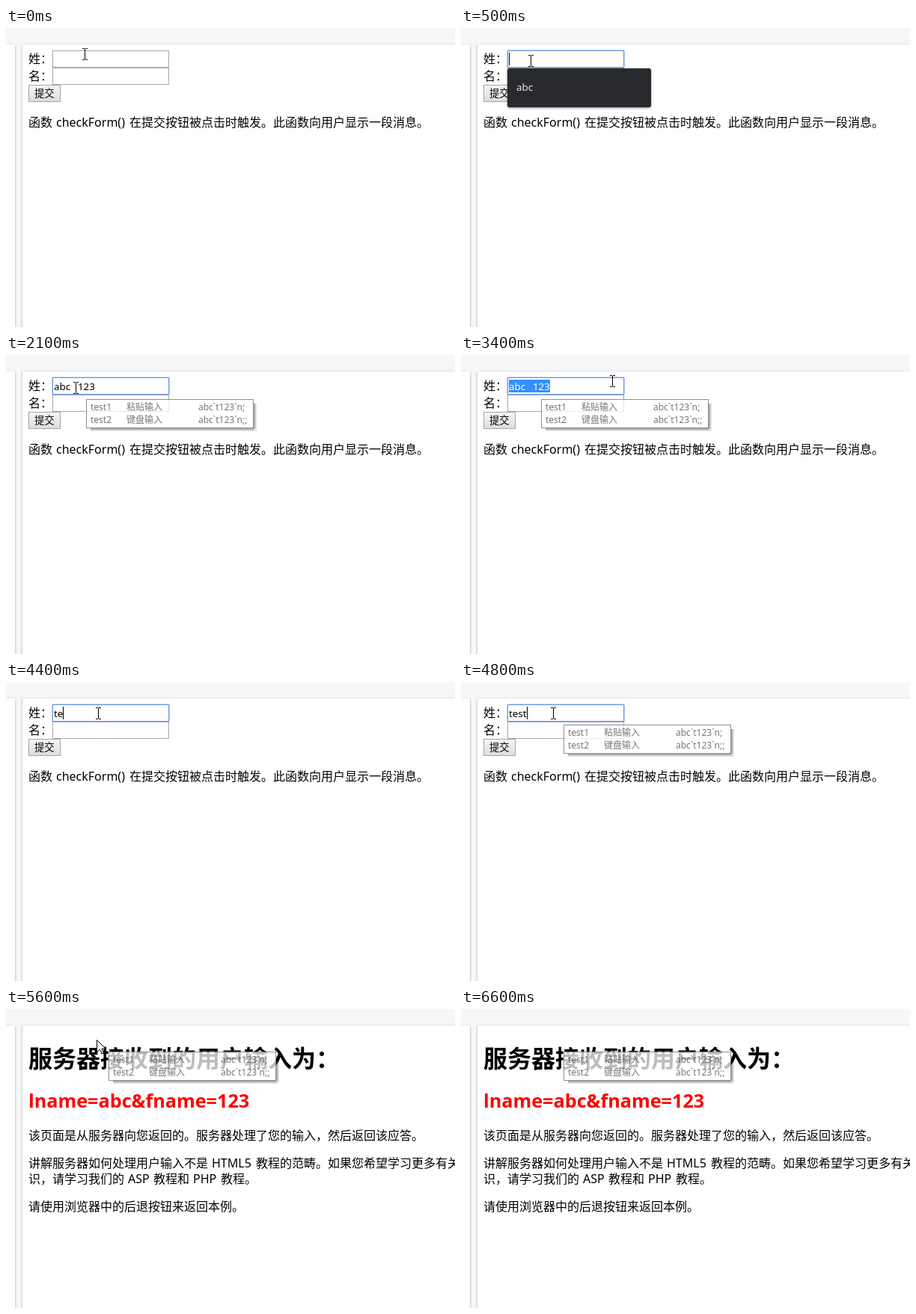
These frames come from a looping animation (600 px wide and 400 px high, 6.9 s). An HTML page with a canvas:

```html
<!DOCTYPE html>
<html lang="zh-CN">
<head>
<meta charset="utf-8">
<title>Form input</title>
<style>
html, body { margin: 0; width: 100%; height: 100%; overflow: hidden; background: #fff; }
canvas { display: block; }
</style>
</head>
<body>
<canvas id="stage" width="600" height="400" lang="zh-CN"></canvas>
<script>
const ctx = document.getElementById('stage').getContext('2d');
const LOOP = 6900, STEP = 100;
const FAMILY = '"Noto Sans", "Noto Sans CJK SC", sans-serif';

// time, x, y of the pointer
const POINTER = [
  [0, 105, 35], [100, 84, 35], [200, 84, 35], [300, 87, 40], [400, 93, 44],
  [2100, 93, 44], [2300, 140, 66], [2400, 154, 69], [2600, 140, 44], [2700, 140, 44],
  [2800, 126, 42], [3000, 60, 46], [3200, 8, 54], [3400, 202, 35],
  [3600, 165, 35], [3700, 165, 35], [4100, 123, 42],
  [5400, 123, 42], [5500, 121, 41], [5900, 121, 41],
  [6000, 146, 42], [6400, 489, 59], [6500, 588, 62]
];

// time, first field, second field, focused field
const TYPING = [
  [0, '', '', 0], [300, '', '', 1], [700, 't', '', 1], [800, 'te', '', 1],
  [1200, 'tes', '', 1], [1300, 'test', '', 1], [1600, 'abc\t123', '', 1],
  [3500, '', '', 1], [4300, 't', '', 1], [4400, 'te', '', 1],
  [4600, 'tes', '', 1], [4700, 'test', '', 1],
  [5200, 'abc', '', 2], [5300, 'abc', '12', 2], [5400, 'abc', '123', 2]
];

const between = (t, a, b) => t >= a && t < b;

function rect(x, y, w, h, color) {
  ctx.fillStyle = color;
  ctx.fillRect(x, y, w, h);
}

function frame(x, y, w, h, color) {
  ctx.strokeStyle = color;
  ctx.lineWidth = 1;
  ctx.strokeRect(x + .5, y + .5, w - 1, h - 1);
}

function text(str, x, y, size = 16, color = '#000', weight = 400) {
  ctx.font = `${weight} ${size}px ${FAMILY}`;
  ctx.fillStyle = color;
  ctx.fillText(str, x, y);
}

function shadow(blur, color, dy = 0) {
  ctx.shadowBlur = blur;
  ctx.shadowColor = color;
  ctx.shadowOffsetY = dy;
}

function pointerAt(t) {
  const i = POINTER.findIndex(p => p[0] > t);
  if (i < 0) return POINTER[POINTER.length - 1].slice(1);
  const [t0, x0, y0] = POINTER[i - 1], [t1, x1, y1] = POINTER[i];
  const k = (t - t0) / (t1 - t0);
  return [Math.round(x0 + (x1 - x0) * k), Math.round(y0 + (y1 - y0) * k)];
}

function drawPanels() {
  rect(0, 0, 600, 400, '#f7f7f7');
  ctx.save();
  shadow(3, 'rgba(0,0,0,.35)', 1);
  rect(-10, 22, 22, 400, '#fff');
  rect(22, 22, 600, 400, '#fff');
  ctx.restore();
}

function inputWidth(str) {
  ctx.font = `400 13.33px ${FAMILY}`;
  const tab = str.indexOf('\t');
  return tab < 0 ? ctx.measureText(str).width
                 : 32 + ctx.measureText(str.slice(tab + 1)).width;
}

function drawField(y, str, focused, caretOn, selectFrom) {
  rect(62, y, 156, 23, '#fff');
  frame(62, y, 156, 23, '#a9a9a9');
  if (focused) {
    ctx.strokeStyle = '#6f9ee4';
    ctx.lineWidth = 1.5;
    ctx.beginPath();
    ctx.roundRect(62.25, y + .25, 155.5, 22.5, 1);
    ctx.stroke();
  }
  const [head, tail] = str.split('\t');
  const put = color => {
    text(head, 64, y + 17, 13.33, color);
    if (tail) text(tail, 96, y + 17, 13.33, color);
  };
  put('#000');
  if (selectFrom < 119) {
    ctx.save();
    ctx.beginPath();
    ctx.rect(selectFrom, y + 3, 119 - selectFrom, 17);
    ctx.clip();
    rect(62, y + 3, 60, 17, '#3390ff');
    put('#fff');
    ctx.restore();
  } else if (focused && caretOn) {
    rect(64 + Math.round(inputWidth(str)), y + 3, 1, 17, '#000');
  }
}

function drawButton() {
  const g = ctx.createLinearGradient(0, 76, 0, 99);
  g.addColorStop(0, '#f6f6f6');
  g.addColorStop(1, '#dcdcdc');
  rect(30, 76, 43, 23, g);
  frame(30, 76, 43, 23, '#a6a6a6');
  text('提交', 38, 92, 13.33);
}

function drawForm(t, pointerX) {
  const [since, first, second, focus] = TYPING.filter(s => s[0] <= t).pop();
  const caretOn = (t - since) % 1000 < 500;
  let selectFrom = 119;
  if (between(t, 2800, 3000)) selectFrom = Math.max(64, Math.min(119, pointerX));
  if (between(t, 3000, 3500)) selectFrom = 64;

  text('姓：', 30, 47);
  text('名：', 30, 70);
  drawField(53, second, focus === 2, caretOn, 119);
  drawField(30, first, focus === 1, caretOn, selectFrom);
  drawButton();
  text('函数', 30, 132);
  text('checkForm()', 67, 132);
  text('在提交按钮被点击时触发。此函数向用户显示一段消息。', 165, 132);
}

function drawSuggestion(alpha) {
  ctx.save();
  ctx.globalAlpha = alpha;
  shadow(3, 'rgba(0,0,0,.5)', 1);
  ctx.fillStyle = '#292a2d';
  ctx.beginPath();
  ctx.roundRect(62, 54, 192, 52, 3);
  ctx.fill();
  shadow(0, 'transparent');
  text('abc', 74, 84, 13.33, '#e8eaed');
  ctx.restore();
}

// the shadow falls only outside the translucent box
function drawHintShadow(x, y) {
  for (let i = 0; i < 4; i++) {
    const shade = `rgba(0,0,0,${.36 - i * .09})`;
    rect(x + 6, y + 39 + i, 218 + i, 1, shade);
    rect(x + 224 + i, y + 6, 1, 33 + i, shade);
  }
}

function drawHint(x, y) {
  drawHintShadow(x, y);
  ctx.save();
  ctx.globalAlpha = .74;
  rect(x, y, 224, 39, '#fff');
  frame(x, y, 224, 39, '#686868');
  [['test1', '粘贴输入', 'abc`t123`n;'], ['test2', '键盘输入', 'abc`t123`n;;']].forEach((row, r) => {
    row.forEach((s, c) => text(s, x + [6, 54, 150][c], y + 15 + r * 17, 12, '#484848'));
  });
  ctx.restore();
}

function drawResult() {
  text('服务器接收到的用户输入为：', 30, 78, 32, '#000', 700);
  text('lname=abc&fname=123', 30, 132, 25.2, '#f00', 700);
  text('该页面是从服务器向您返回的。服务器处理了您的输入，然后返回该应答。', 30, 175);
  text('讲解服务器如何处理用户输入不是', 30, 212);
  text('HTML5', 275, 212);
  text('教程的范畴。如果您希望学习更多有关', 334, 212);
  text('识，请学习我们的', 30, 233);
  text('ASP', 163, 233);
  text('教程和', 197, 233);
  text('PHP', 250, 233);
  text('教程。', 287, 233);
  text('请使用浏览器中的后退按钮来返回本例。', 30, 270);
}

function drawBeam(x, y) {
  rect(x, y - 7, 1, 14, '#000');
  for (const edge of [y - 8, y + 7]) {
    rect(x - 3, edge, 3, 1, '#000');
    rect(x + 1, edge, 3, 1, '#000');
  }
}

function drawArrow(x, y) {
  const outline = [[0, 0], [0, 16], [4, 12.5], [7, 18.5], [9, 17.5], [6.5, 11.5], [11.5, 11.5]];
  ctx.beginPath();
  outline.forEach(([dx, dy]) => ctx.lineTo(x + .5 + dx, y + .5 + dy));
  ctx.closePath();
  ctx.fillStyle = '#fff';
  ctx.fill();
  ctx.strokeStyle = '#000';
  ctx.lineWidth = 1;
  ctx.stroke();
}

function draw(time) {
  const t = Math.floor((time % LOOP) / STEP) * STEP;
  const [x, y] = pointerAt(t);
  drawPanels();
  if (t < 5500) drawForm(t, x);
  if (t >= 5600) drawResult();
  if (between(t, 400, 800)) drawSuggestion(between(t, 500, 700) ? 1 : .6);
  if (between(t, 1400, 3800)) drawHint(107, 59);
  if (t >= 4800) drawHint(137, 57);
  const overHeading = between(t, 6000, 6600) && x < 440;
  if (t < 5500 || overHeading) drawBeam(x, y);
  else if (t < 6600) drawArrow(x, y);
}

const start = performance.now();
function tick() {
  draw(performance.now() - start);
  requestAnimationFrame(tick);
}
tick();
</script>
</body>
</html>
```
